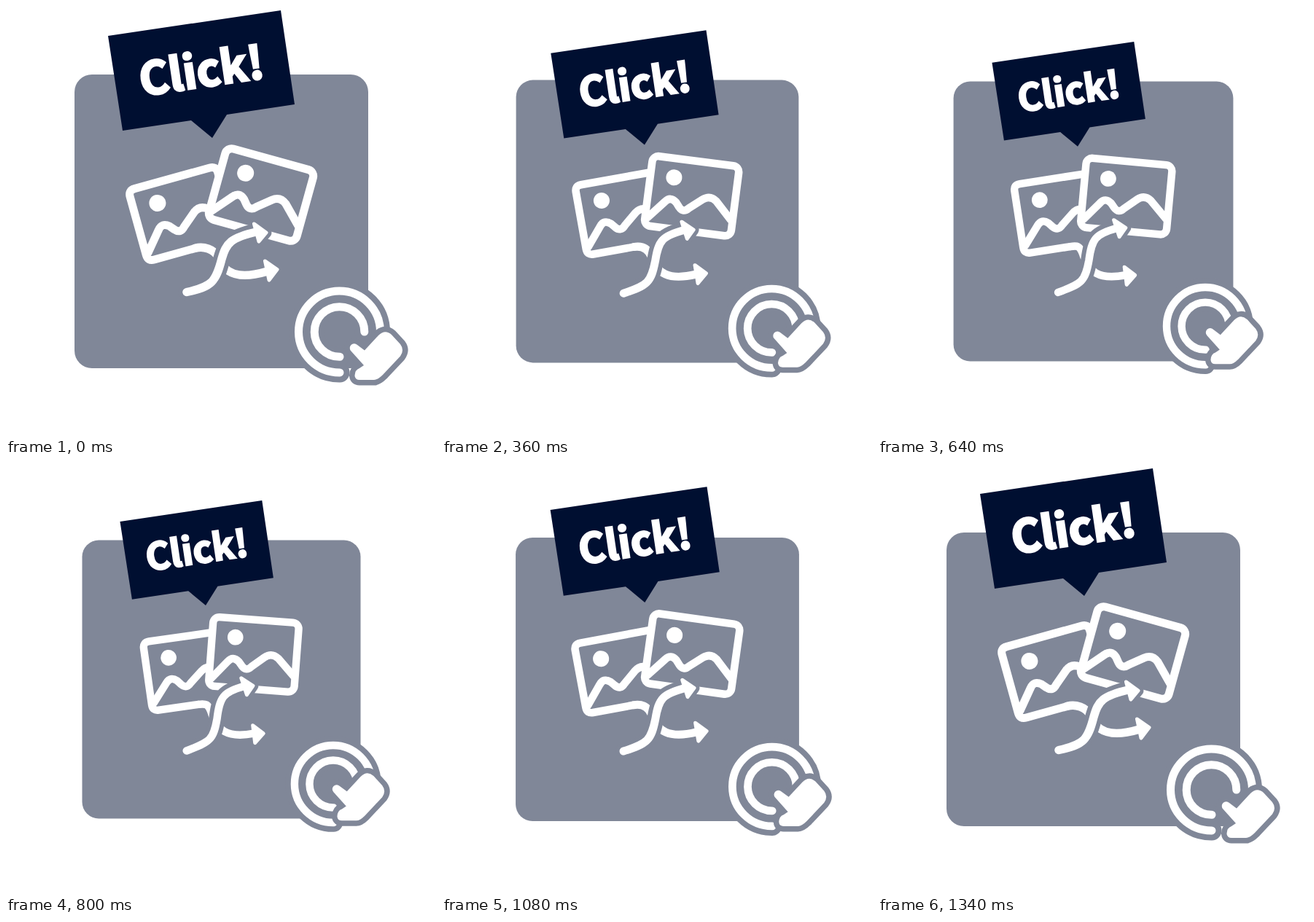
Animation of 590x590 px, one loop 1.94 s. Source, as an HTML page:

```html
<!DOCTYPE html>
<html lang="en">
<head>
<meta charset="utf-8">
<title>Click</title>
<style>
  html, body { margin: 0; width: 100%; height: 100%; overflow: hidden; background: #fff; }
  svg { display: block; width: 590px; height: 590px; }
  .line { fill: none; stroke: #fff; stroke-width: 11; stroke-linecap: round; stroke-linejoin: round; }
  .halo { fill: none; stroke: #808798; stroke-linecap: round; stroke-linejoin: round; }
  .head { fill: #fff; stroke: #fff; stroke-width: 5; stroke-linejoin: round; }
  .gray { fill: #808798; }
  .navy { fill: #000f31; }
  .white { fill: #fff; }
  text {
    font: 700 62px "Noto Sans CJK JP", "Noto Sans CJK SC", "Noto Sans CJK", "Noto Sans", sans-serif;
    stroke: #fff; stroke-width: 3;
  }
</style>
</head>
<body>
<svg viewBox="0 0 590 590">
  <defs>
    <g id="scene">
      <circle class="white" cx="-28.5" cy="-23" r="11.5"/>
      <path class="line" d="M-59 39L-37 13Q-30 4 -21 12L-16 18Q-9 26 -2 18L16 3Q26 -5 36 3L60 27"/>
    </g>
    <path id="outer" d="M458 503A56 56 0 1 1 513.5 447"/>
    <path id="inner" d="M458 481.3A34.3 34.3 0 1 1 491.8 447"/>
    <path id="palm" d="M473.5 473.5A6 6 0 0 1 482 465L492 472.500L511 452Q520 443 529 451L541 464Q547 472 541 480.5L517 506Q510 513 505 513H485Q479 513 478.5 507Q479 499 485 497L491 493Z"/>
  </defs>

  <rect id="card" class="gray" x="94" y="94" width="403" height="403" rx="24"/>

  <g id="left">
    <path class="line" d="M62.5 -20V-41.5Q62.5 -50.5 53.5 -50.5H-53.5Q-62.5 -50.5 -62.5 -41.5V41.5Q-62.5 50.5 -53.5 50.5H5"/>
    <use href="#scene"/>
  </g>
  <g id="right">
    <rect class="line" style="fill:#808798" x="-62.5" y="-50.5" width="125" height="101" rx="9"/>
    <use href="#scene"/>
  </g>

  <g id="arrows">
    <path id="lowLine" class="line"/>
    <path id="lowHead" class="head"/>
    <path id="upHalo" class="halo"/>
    <path id="upHeadHalo" class="halo" stroke-width="15"/>
    <path id="upLine" class="line"/>
    <path id="upHead" class="head"/>
  </g>

  <g id="rings">
    <g class="halo" stroke-width="27">
      <use href="#outer"/>
      <use href="#inner"/>
    </g>
    <use href="#outer" class="line"/>
    <use href="#inner" class="line"/>
  </g>

  <g id="hand">
    <use href="#palm" class="halo" stroke-width="15"/>
    <use href="#palm" class="white"/>
  </g>

  <g id="bubble">
    <path class="navy" d="M-143 -140L94 -175L113 -46L20 -32L0 0L-29 -24L-123 -10Z"/>
    <text class="white" transform="rotate(-8.4)" x="-1.2" y="-71" text-anchor="middle">Click!</text>
  </g>
</svg>

<script>
const LOOP = 1940, STEP = 20;
const $ = id => document.getElementById(id);
const set = (id, name, value) => $(id).setAttribute(name, value);
const lerp = (a, b, k) => a + (b - a) * k;
const span = (t, a, b) => Math.min(1, Math.max(0, (t - a) / (b - a)));
const sine = u => (1 - Math.cos(Math.PI * u)) / 2;
const quad = u => u < 0.5 ? 2 * u * u : 1 - 2 * (1 - u) ** 2;

// Blend two path strings that have the same commands.
const NUM = /-?\d+(\.\d+)?/g;
function blend([a, b], k) {
  const to = b.match(NUM);
  let i = 0;
  return a.replace(NUM, n => lerp(+n, +to[i++], k).toFixed(2));
}

// Each pair: resting shape, pressed shape.
const UP_LINE = ["M248 392.5C283 385 288 378 296 347C302 325 308 318 345 309.5",
                 "M250 395.5C282 382 286 380 290 352C293 320 297 313 325 305"];
const UP_HEAD = ["M340.5 299L357 311L347 323Z", "M320 294L336 304L328 316.5Z"];
const LOW_TAIL = ["286 333 292 346C300 367 318 376 357 364.5",
                  "279 331 283 341C291 367 305 378 342 371"];
const LOW_HEAD = ["M355.5 350L372 361.5L361 376Z", "M340.5 360L355 371L343.5 384Z"];

function place(id, x, y, scale, angle = 0) {
  set(id, "transform", `translate(${x} ${y}) rotate(${angle}) scale(${scale})`);
}

function zoom(id, cx, cy, scale, dx = 0, dy = 0) {
  place(id, cx + dx - cx * scale, cy + dy - cy * scale, scale);
}

function draw(t) {
  const press = quad(span(t, 200, 500)) - sine(span(t, 835, 1340));
  const lift = 0.41 * (sine(span(t, 500, 720)) - sine(span(t, 720, 890)));
  const x = press - lift;

  zoom("card", 295.5, 295.5, 1 - 0.067 * x);

  const size = 1 - 0.075 * x;
  const lx = lerp(241.5, 256, x), ly = lerp(285, 283, x), tilt = lerp(-15.5, -6, x);
  place("left", lx, ly, size, tilt);
  place("right", lerp(350, 337, x), lerp(259, 262, x), size, lerp(15.5, 1.1, x));

  // The lower arrow grows out of the left frame's bottom edge.
  const dx = -8 * lift, dy = -6 * lift;
  const c = Math.cos(tilt * Math.PI / 180), s = Math.sin(tilt * Math.PI / 180);
  const edge = u => `${lx + size * (u * c - 50.5 * s) - dx} ${ly + size * (u * s + 50.5 * c) - dy}`;
  const upLine = blend(UP_LINE, x), upHead = blend(UP_HEAD, x);
  const width = lerp(11.5, 10.5, press);
  set("arrows", "transform", `translate(${dx} ${dy})`);
  set("lowLine", "d", `M${edge(5)}C${edge(16)} ${blend(LOW_TAIL, press)}`);
  set("lowHead", "d", blend(LOW_HEAD, press));
  set("upHalo", "d", upLine);
  set("upHalo", "stroke-width", width + 12);
  set("upHeadHalo", "d", upHead);
  set("upLine", "d", upLine);
  set("upHead", "d", upHead);
  for (const id of ["lowLine", "upLine"]) $(id).style.strokeWidth = width;

  zoom("rings", 295.5, 295.5, 1 - 0.056 * (press - lift / 4));
  zoom("hand", 510, 480, 1 - 0.015 * x, -31.5 * x, -30 * x);
  place("bubble", 283 - 9 * press, 181 + 17 * press - 18 * lift, 1 - 0.178 * press);
}

const start = performance.now();
function tick() {
  const t = (performance.now() - start) % LOOP;
  draw(Math.floor(t / STEP) * STEP);
  requestAnimationFrame(tick);
}
tick();
</script>
</body>
</html>
```
